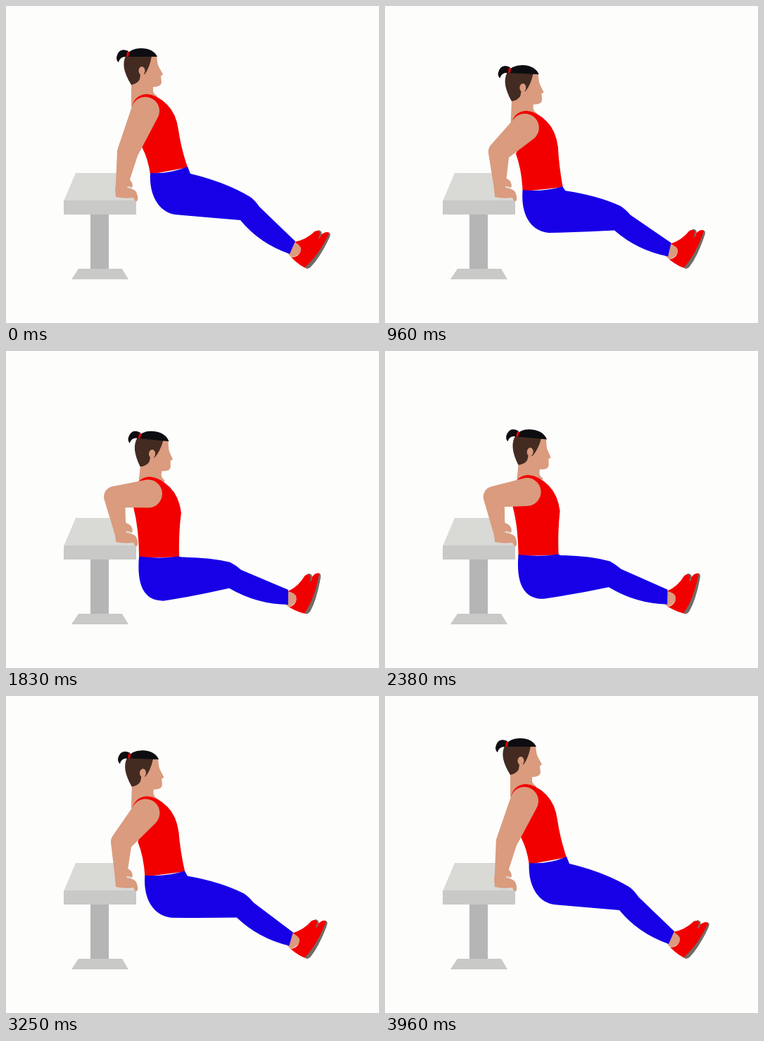
These frames come from a looping animation (530 px wide and 450 px high, 4 s). An HTML page:

```html
<!DOCTYPE html>
<html lang="en">
<head>
<meta charset="utf-8">
<title>Bench dip</title>
<style>
html, body { margin: 0; width: 100%; height: 100%; overflow: hidden; background: #fdfdfc; }
svg { display: block; width: 530px; height: 450px; }
.skin { fill: #da9b7e; }
.red { fill: #f20000; }
.sole { fill: #6f6c66; }
.pants { fill: #1700e6; }
.dark { fill: #0d0d11; }
.brown { fill: #432b21; }
.top { fill: #d9d9d5; }
.edge { fill: #c9c9c8; }
.post { fill: #b5b5b5; }
</style>
</head>
<body>
<svg viewBox="0 0 530 450">
  <path class="post" d="M120 294H146V374H120Z"/>
  <path class="edge" d="M103 373H165L174 388H93Z"/>
  <path class="top" d="M99 237H168L186 277H82Z"/>
  <path class="edge" d="M82 276H185V296H82Z"/>
  <path class="skin" d="M166 243Q176 245 178 249Q181 254 179 258Q174 254 167 257Z"/>
  <g id="head">
    <path class="skin" d="M178 100L205 68L214 70Q215 84 218 88L223 97Q222 99 220 99L221 108Q221 115 209 115V121Q210 125 215 128L205 140L178 143Z"/>
    <path class="brown" d="M170 71C165 82 167 94 178 112Q187 110 190 104L191 97H197Q204 88 207 71Z"/>
    <ellipse class="skin" cx="193" cy="92" rx="4.5" ry="6"/>
    <path class="dark" d="M169 72Q176 60 192 60Q209 60 215 72Z"/>
    <path class="dark" d="M174 64Q160 58 157 73Q157 78 160 80Q162 71 172 72Z"/>
    <path class="red" d="M172 65H175L174 72H171Z"/>
  </g>
  <path id="torso" class="red"/>
  <g id="foot">
    <path class="sole" d="M445 318Q451 319 450 324L442 338Z"/>
    <path class="red" d="M411 335Q428 332 440 320Q447 317 448 323L440 342L420 348Z"/>
    <path class="skin" d="M402 351L410 334Q421 340 421 346Q420 354 407 357Z"/>
    <path class="red" d="M421 344C432 331 448 334 449 325Q456 319 461 322Q463 335 430 373Q420 370 407 357Q420 356 421 344Z"/>
    <path class="sole" d="M461 322Q464 324 460 331Q447 358 434 371Q430 374 426 371Q446 354 461 322Z"/>
  </g>
  <path id="pants" class="pants"/>
  <path id="arm" class="skin"/>
  <path class="skin" d="M155 258H170Q182 259 185 264Q189 273 186 277Q183 278 181 272Q168 274 156 271Z"/>
</svg>
<script>
const LOOP = 4000, STEP = 1000 / 24;
const $ = id => document.getElementById(id);
const polar = ([x, y], r, a) => `${x + r * Math.cos(a)} ${y + r * Math.sin(a)}`;

// Outline around two circles of different size: one limb segment.
function limb(a, ra, b, rb) {
  const dx = b[0] - a[0], dy = b[1] - a[1];
  const dir = Math.atan2(dy, dx), spread = Math.acos((ra - rb) / Math.hypot(dx, dy));
  const lo = dir - spread, hi = dir + spread;
  return `M${polar(a, ra, hi)}A${ra} ${ra} 0 1 1 ${polar(a, ra, lo)}` +
    `L${polar(b, rb, lo)}A${rb} ${rb} 0 0 1 ${polar(b, rb, hi)}Z`;
}

// Depth of the dip: a cosine that lags slightly on the way down.
function depth(t) {
  const a = 2 * Math.PI * t / LOOP;
  return (1 - Math.cos(a - .06 * (Math.sin(a / 2) + Math.sin(a) / 2))) / 1.96;
}

function draw(time) {
  const t = Math.floor((time % LOOP + 5) / STEP) * STEP % LOOP;
  const p = depth(t), early = p ** .65, late = p * p;

  // A point at rest plus its drift towards the bottom of the dip.
  const at = (x, y, dx, dy, k = p) => `${x + dx * k} ${y + dy * p}`;
  const shoulder = [198 + 4 * late, 149 + 54 * p];
  const elbow = [173 - 19 * early, 207];
  const wrist = [163, 262];
  const near = (x, y) => `${shoulder[0] + x} ${shoulder[1] + y}`;

  $("arm").setAttribute("d", limb(shoulder, 20, elbow, 15) + limb(elbow, 15, wrist, 7.5));

  $("torso").setAttribute("d",
    `M${near(-19, -6)}Q${near(-15, -23)} ${near(2, -24)}` +
    `Q${near(17, -23)} ${near(31, -9)}Q${near(44, 4)} ${near(47, 27)}` +
    `Q${at(249, 203, -4, 57)} ${at(258, 229, -12, 64)}L${at(205, 239, -16, 55, early)}` +
    `Q${at(202, 217, -13, 36, early)} ${at(193, 200, -12, 22, early)}L${near(0, 10)}Z`);

  $("pants").setAttribute("d",
    `M${at(205, 237, -16, 55, early)}Q${at(232, 239, -14, 57)} ${at(258, 228, -13, 64)}` +
    `L${at(262, 238, -13, 55)}Q${at(312, 250, -23, 43)} ${at(347, 271, -29, 29)}` +
    `Q${at(354, 276, -28, 28)} ${at(360, 285, -26, 26)}` +
    `L${at(411, 334, -10, 5)}L${at(403, 352, -2, 8)}` +
    `Q${at(360, 337, -3, 23)} ${at(333, 304, -16, 33)}` +
    `Q${at(284, 300, -15, 48)} ${at(240, 296, -15, 59)}` +
    `C${at(215, 292, -16, 64)} ${at(203, 265, -18, 73, early)} ${at(205, 237, -16, 55, early)}Z`);

  $("head").setAttribute("transform", `translate(${15 * late} ${54 * p}) rotate(${5.7 * p} 190 90)`);
  $("foot").setAttribute("transform", `translate(-1.5 0) rotate(${-15.5 * p} 430 372)`);
}

let start;
function tick(now) {
  start ??= now;
  draw(now - start);
  requestAnimationFrame(tick);
}
draw(0);
requestAnimationFrame(tick);
</script>
</body>
</html>
```
